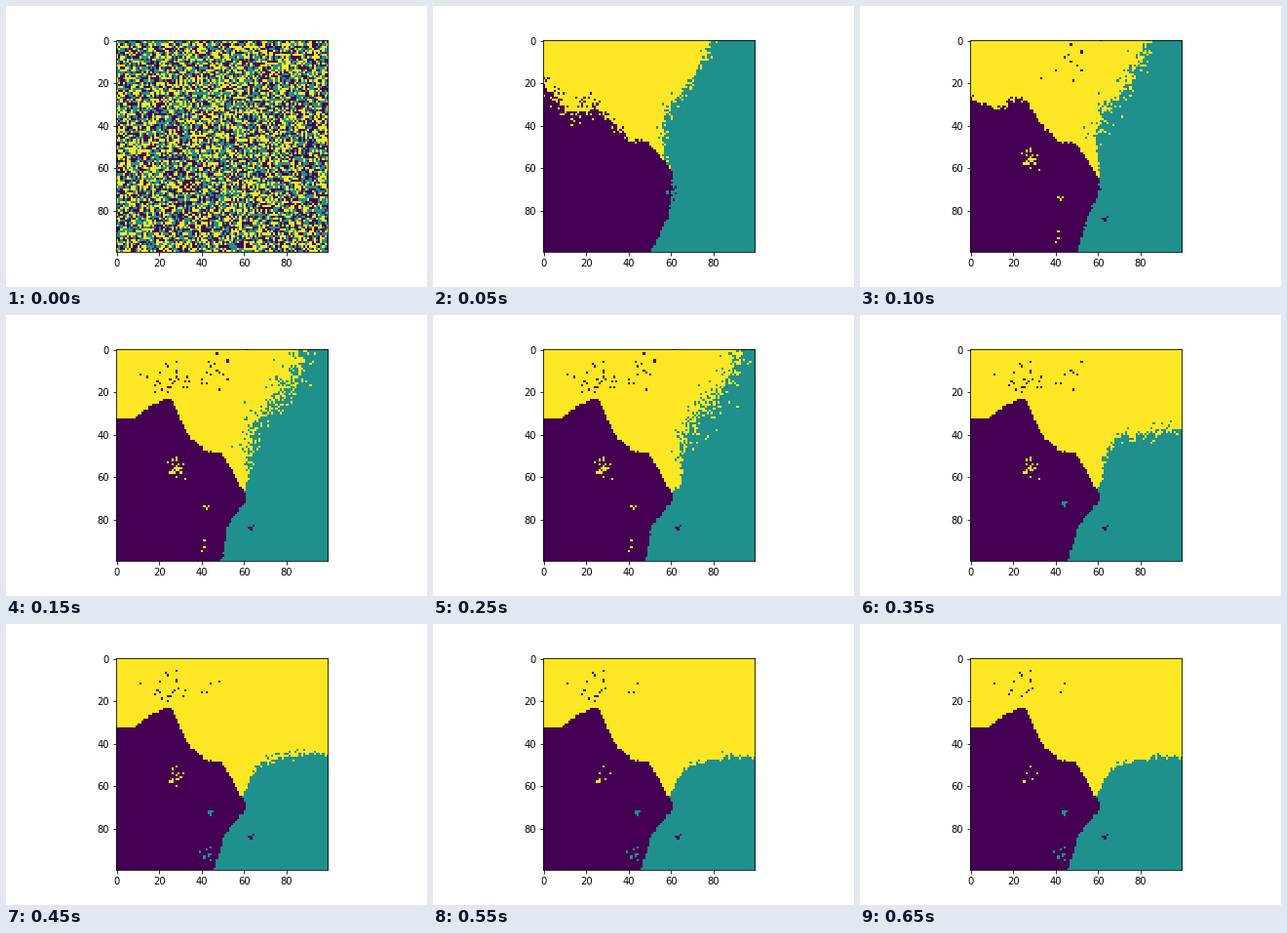
A matplotlib script that plays this animation: 432x288 px, repeating every 750 ms.

```python
import numpy as np
import matplotlib.pyplot as plt
from matplotlib.animation import FuncAnimation
from matplotlib.path import Path

SIZE, FRAMES, INTERVAL = 100, 15, 50
PURPLE, TEAL, YELLOW = 0, 1, 2
SETTLED = 11

rng = np.random.default_rng(7)
start = rng.integers(0, 3, (SIZE, SIZE))
purple_noise = np.clip(rng.normal(size=(2, SIZE, SIZE)), -2.3, 2.3)
teal_noise = np.clip(rng.laplace(scale=0.75, size=(2, SIZE, SIZE)), -3, 3)
row, col = np.mgrid[0:SIZE, 0:SIZE] + 0.5

# Edge between yellow and teal, from the point where all regions meet outwards.
EDGE_TIMES = [1, 5, 7, 10]
EDGES = np.array([
    [(61, 62.5), (57, 55), (56, 42), (59, 32), (69, 22), (80, 0)],
    [(61, 68), (65.5, 63), (63.5, 50), (70, 35), (85, 18), (94, 0)],
    [(60, 66), (62.5, 62), (63, 50), (69, 42), (84, 41), (100, 37.5)],
    [(59.5, 65), (61.5, 62), (65, 54), (70, 50.5), (82, 47.5), (100, 46.5)],
])


def scatter(label, center, spread, count, born, dies):
    """Stray cells around a center; each vanishes at a random time."""
    places = rng.normal(center, spread, (count, 2))
    x, y = np.clip(places, 0, SIZE - 1).astype(int).T
    last = rng.integers(dies[0], dies[1] + 1, count)
    return label, x, y, born, np.where(last > SETTLED, FRAMES, last)


STRAYS = [
    scatter(PURPLE, (27, 14), (10, 4), 32, 3, (4, 22)),
    scatter(PURPLE, (49, 10), (6, 5), 12, 2, (3, 7)),
    scatter(YELLOW, (28, 57), (2.2, 2.5), 26, 2, (3, 13)),
    scatter(YELLOW, (43, 74), (1.2, 1.2), 4, 2, (5, 6)),
    scatter(YELLOW, (41, 92), (1.2, 2.5), 3, 2, (5, 6)),
    scatter(PURPLE, (63, 84.7), (0.6, 0.8), 5, 2, (14, 14)),
    scatter(TEAL, (44, 73.5), (0.8, 1.2), 7, 7, (14, 14)),
    scatter(TEAL, (42, 93), (1.5, 2.5), 10, 8, (14, 14)),
]


def edge_at(frame):
    i = min(np.searchsorted(EDGE_TIMES, frame, side="right"), len(EDGES) - 1)
    t0, t1 = EDGE_TIMES[i - 1:i + 1]
    t = min((frame - t0) / (t1 - t0), 1)
    ease = 1 - (1 - t) ** 1.7
    return EDGES[i - 1] + (EDGES[i] - EDGES[i - 1]) * ease


def purple_cells(frame):
    early = np.clip((3 - frame) / 2, 0, 1)
    top_early = np.interp(col, [0, 13, 25, 40, 50, 61], [21, 36, 31, 46.5, 49, 62.5])
    top_late = np.interp(col, [0, 9, 18, 26, 34, 43, 50, 61],
                         [33.5, 32.5, 26, 23.5, 41, 48.5, 49.5, 69])
    top = top_late + (top_early - top_late) * early
    top_rough = 0.2 + early ** 2 * np.clip((50 - col) / 9, 0.2, 3.5)

    drift = 3.5 * np.clip((frame - 3) / 4, 0, 1)
    side_early = np.interp(row, [62, 82, 100], [61, 59.5, 51])
    side_late = np.interp(row, [72, 84, 100], [61, 52, 50])
    side_late -= drift * np.clip((row - 70) / 30, 0, 1)
    side = side_late + (side_early - side_late) * early
    side_rough = 0.3 + 1.8 * early * np.exp(-((row - 71) / 4) ** 2)
    return ((row > top + purple_noise[0] * top_rough)
            & (col < side + purple_noise[1] * side_rough))


def teal_cells(frame):
    edge = edge_at(frame)
    outline = np.vstack([edge, [(101, edge[-1, 1]), (101, 101), (40, 101), (40, 70)]])
    # Only the middle of the edge keeps calming down at the end.
    middle = (col > 63) & (col < 92) & (row > 43) & (row < 61)
    age = np.where(middle, frame, min(frame, SETTLED))
    rough = np.interp(age, [1, 3, 5, 7, 13], [1.8, 4, 4, 1.9, 1.4])
    rough = rough * np.clip((64 - row) / 25, 0.12, 1)
    x, y = np.clip([col, row] + teal_noise * rough, 0.5, 99.5)
    points = np.column_stack([x.ravel(), y.ravel()])
    return Path(outline).contains_points(points).reshape(SIZE, SIZE)


def labels(frame):
    if frame == 0:
        return start
    grid = np.where(teal_cells(frame), TEAL, YELLOW)
    grid[purple_cells(frame)] = PURPLE
    for label, x, y, born, last in STRAYS:
        alive = (frame >= born) & (frame <= last)
        grid[y[alive], x[alive]] = label
    return grid


plt.rcParams["font.family"] = "DejaVu Sans"
plt.rcParams["font.size"] = 10
fig, ax = plt.subplots(figsize=(6, 4), dpi=72, facecolor="white")
fig.subplots_adjust(left=0.125, right=0.9, bottom=0.125, top=0.88)
image = ax.imshow(start, cmap="viridis", vmin=0, vmax=2, interpolation="nearest")
ax.set_xticks(range(0, SIZE, 20))
ax.set_yticks(range(0, SIZE, 20))


def update(frame):
    image.set_data(labels(frame))
    return [image]


anim = FuncAnimation(fig, update, frames=FRAMES, interval=INTERVAL,
                     repeat=True, repeat_delay=0, blit=False)
plt.show()
```
